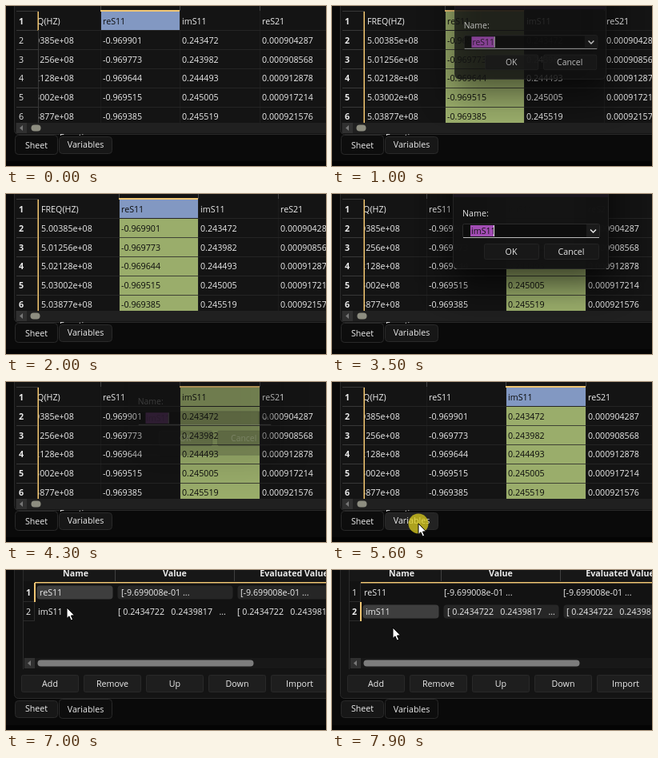
Animation of 400x200 px, one loop 8 s. Source, as an HTML page with a canvas:

```html
<!DOCTYPE html>
<html>
<head>
<meta charset="utf-8">
<style>
html, body { margin: 0; height: 100%; overflow: hidden; background: #0a0a0a; }
canvas { display: block; }
</style>
</head>
<body>
<canvas id="stage" width="400" height="200"></canvas>
<script>
const ctx = document.getElementById('stage').getContext('2d');
const LOOP = 8000, STEP = 100;
const ORANGE = '#f0c674', GREEN = '#9aad6b', BLUE = '#8298c2', LIGHT = '#ececec', EDGE = '#292929';

const columns = [
  { x: 41, w: 100, name: 'FREQ(HZ)', cells: ['5.00385e+08', '5.01256e+08', '5.02128e+08', '5.03002e+08', '5.03877e+08'] },
  { x: 141, w: 99, name: 'reS11', cells: ['-0.969901', '-0.969773', '-0.969644', '-0.969515', '-0.969385'] },
  { x: 240, w: 100, name: 'imS11', cells: ['0.243472', '0.243982', '0.244493', '0.245005', '0.245519'] },
  { x: 340, w: 100, name: 'reS21', cells: ['0.000904287', '0.000908568', '0.000912878', '0.000917214', '0.000921576'] }
];

// Pointer path: time, x, y
const path = [[4800, 112, 205], [4900, 111, 195], [5000, 110, 186], [5200, 108, 177], [5700, 108, 177],
  [6000, 106, 105], [6300, 100, 28], [6400, 99, 28], [7000, 76, 47], [7200, 74, 57], [7600, 74, 57], [7900, 76, 72]];

function rect(x, y, w, h, color) {
  ctx.fillStyle = color;
  ctx.fillRect(x, y, w, h);
}

function box(x, y, w, h, r, fill, stroke) {
  ctx.beginPath();
  ctx.roundRect(x + .5, y + .5, w - 1, h - 1, r);
  ctx.fillStyle = fill;
  ctx.fill();
  if (stroke) {
    ctx.strokeStyle = stroke;
    ctx.lineWidth = 1;
    ctx.stroke();
  }
}

function text(s, x, y, { color = LIGHT, bold = false, align = 'left' } = {}) {
  ctx.font = `${bold ? 'bold ' : ''}10.7px "Open Sans", "Noto Sans", sans-serif`;
  ctx.textAlign = align;
  ctx.fillStyle = color;
  ctx.fillText(s, x, Math.round(y + 4));
}

function clipped(x, y, w, h, draw) {
  ctx.save();
  ctx.beginPath();
  ctx.rect(x, y, w, h);
  ctx.clip();
  draw();
  ctx.restore();
}

function line(points, color, width = 1) {
  ctx.beginPath();
  points.forEach(([x, y]) => ctx.lineTo(x, y));
  ctx.strokeStyle = color;
  ctx.lineWidth = width;
  ctx.stroke();
}

function frame(variables, hover) {
  rect(0, 0, 400, 200, '#0a0a0a');
  rect(0, 194, 400, 6, '#040404');
  box(10, -10, 410, 171, 5, '#141414', EDGE);
  const tab = (x, w, name, active) => {
    const y = active ? 161 : 163;
    box(x, y, w, active ? 25 : 22, 4, active ? '#0d0d0d' : hover ? '#222' : '#171717', EDGE);
    text(name, x + w / 2, active ? 174 : 173, { align: 'center' });
  };
  tab(11, 54, 'Sheet', !variables);
  tab(66, 67, 'Variables', variables);
}

function scrollbar(x, y, thumbX, thumbW, track, color) {
  rect(x, y, 400 - x, 13, track);
  rect(x + 1, y, 13, 13, '#303030');
  ctx.beginPath();
  ctx.moveTo(x + 9, y + 3);
  ctx.lineTo(x + 5, y + 6.5);
  ctx.lineTo(x + 9, y + 10);
  ctx.fillStyle = '#777';
  ctx.fill();
  box(thumbX, y + 2, thumbW, 9, 4, color);
}

function sheet(selected, filled, scroll, dialogOpen) {
  const rowY = i => Math.round(6.6 + i * 23.8);
  clipped(11, 0, 389, 147, () => {
    for (const [i, col] of columns.entries()) {
      const x = col.x - scroll, active = i === selected;
      rect(x + col.w, 0, 1, 6, '#444');
      rect(x + col.w, 6, 1, 141, '#1c1c1c');
      if (active) {
        rect(x + 1, 7, col.w - 1, 23, dialogOpen ? GREEN : BLUE);
        if (filled) rect(x + 1, 31, col.w - 1, 116, GREEN);
        rect(x, 5, col.w, 2, ORANGE);
      }
      [col.name, ...col.cells].forEach((s, r) => {
        const dark = active && (r === 0 || filled);
        text(s, x + 3, 19 + r * 23.8, { color: dark ? '#0c0c0c' : LIGHT });
      });
    }
    for (let r = 1; r < 6; r++) rect(40, rowY(r), 360, 1, 'rgba(40,40,40,.8)');
    rect(11, 0, 30, 147, '#141414');
    rect(13, 6, 28, 1, '#383838');
    for (let r = 0; r < 6; r++) {
      const marked = filled || r === 0;
      text(r + 1, 19, 19 + r * 23.8, { bold: marked, align: 'center' });
      rect(13, rowY(r + 1), 27, 1, '#383838');
      rect(40, rowY(r), 1, 24, marked ? ORANGE : '#383838');
      if (marked) rect(39, rowY(r), 1, 24, '#8a7040');
    }
  });
  scrollbar(12, 146, scroll ? 31 : 30, 13, '#202020', '#8d8d80');
  clipped(60, 159, 70, 3, () => text('Functions', 67, 163.5));
}

function variablesPage(row) {
  rect(21, 0, 379, 124, '#121212');
  rect(21, 0, 1, 124, '#2b2b2b');
  rect(22, 0, 378, 14, '#171717');
  ['Name', 'Value', 'Evaluated Value'].forEach((s, i) =>
    text(s, [87, 211, 360][i], 4, { bold: true, align: 'center' }));
  rect(36, 15, 364, 1.5, row < 0 ? '#2b2b2b' : ORANGE);
  for (const x of [136, 285]) rect(x, 0, 1, 14, '#404040');
  for (let r = 0; r < 2; r++) {
    const y = 28 + r * 24, on = r === row;
    if (on) {
      box(38, y - 9, 96, 18, 4, '#3e3e3e');
      box(139, y - 9, 145, 18, 4, '#262626');
      box(289, y - 9, 120, 18, 4, '#262626');
    }
    const value = r ? '[ 0.2434722   0.2439817   ...' : '[-9.699008e-01 ...';
    text(r + 1, 28, y, { bold: on, align: 'center' });
    text(r ? 'imS11' : 'reS11', on ? 42 : 40, y);
    clipped(137, y - 12, 147, 24, () => text(value, on ? 144 : 140, y));
    text(value, on ? 293 : 289, y);
    rect(22, y + 11, 14, 1, '#2b2b2b');
    rect(35, y - 12, on ? 2 : 1, 24, on ? ORANGE : '#2b2b2b');
  }
  scrollbar(22, 110, 39, 271, '#181818', '#7c7c7c');
  ['Add', 'Remove', 'Up', 'Down', 'Import'].forEach((s, i) => {
    const x = 19 + i * 78;
    box(x, 131, 72, 22, 2, '#1e1e1e', EDGE);
    text(s, x + 36, 142, { align: 'center' });
  });
}

function dialog(name, alpha, scale) {
  const layer = draw => {
    ctx.save();
    ctx.globalAlpha = alpha;
    draw();
    ctx.restore();
  };
  ctx.save();
  ctx.translate(229, 10);
  ctx.scale(scale, scale);
  ctx.translate(-229, -10);
  layer(() => {
    ctx.shadowColor = 'rgba(0,0,0,.65)';
    ctx.shadowBlur = 40;
    ctx.shadowOffsetY = 18;
    box(151, -70, 195, 164, 6, '#141414', '#242424');
  });
  layer(() => {
    rect(152, 0, 193, 4, '#1b1720');
    text('Name:', 163, 24);
    box(163, 37, 172, 18, 2, '#0e0e0e', '#2c2c2c');
    rect(164, 54, 170, 1, '#bbb');
    rect(173, 39, 29, 14, '#a64fb8');
    text(name, 174, 46, { color: '#101010' });
    rect(202, 39, 1, 14, '#eee');
    rect(318, 38, 16, 16, '#1c1c1c');
    line([[323, 44.5], [326.5, 48], [330, 44.5]], '#eee', 1.5);
    for (const [label, x] of [['OK', 190], ['Cancel', 265]]) {
      box(x, 62, 69, 20, 2, '#191919', '#242424');
      text(label, x + 34, 72, { align: 'center' });
    }
  });
  ctx.restore();
}

function pointer(t) {
  if (t < 4900) return;
  let i = path.findIndex(p => p[0] >= t);
  if (i < 1) i = path.length - 1;
  const [a, b] = [path[i - 1], path[i]];
  const k = Math.min(1, (t - a[0]) / (b[0] - a[0]));
  const x = a[1] + (b[1] - a[1]) * k, y = a[2] + (b[2] - a[2]) * k;
  if ([5600, 5700, 6300, 7400].includes(t)) {
    ctx.beginPath();
    ctx.arc(x, y, 12.5, 0, 7);
    ctx.fillStyle = 'rgba(220,205,30,.75)';
    ctx.fill();
  }
  ctx.beginPath();
  [[0, 0], [0, 13.5], [3, 10.8], [5.2, 16], [7.6, 15], [5.4, 10], [9.6, 9.8]]
    .forEach(([dx, dy]) => ctx.lineTo(x + dx, y + dy));
  ctx.closePath();
  ctx.lineWidth = 1;
  ctx.strokeStyle = '#000';
  ctx.fillStyle = '#fff';
  ctx.fill();
  ctx.stroke();
}

// Opacity of a dialog that opens and closes in short fades
function fade(t, open, close) {
  if (t < open || t >= close + 200) return 0;
  if (t >= close) return t === close ? .6 : .2;
  return Math.min(1, .78 + (t - open) / 1000);
}

function draw(now) {
  const t = Math.floor(now % LOOP / STEP) * STEP;
  const variables = t >= 5700;
  frame(variables, t >= 5000 && !variables);
  if (variables) {
    variablesPage(t < 6300 ? -1 : t < 7400 ? 0 : 1);
  } else {
    const second = t >= 2500;
    const alpha = second ? fade(t, 3300, 4200) * (t >= 3500) : fade(t, 1000, 1800);
    const filled = second ? t >= 3000 : t >= 500;
    sheet(second ? 2 : 1, filled, t < 500 || second ? 23 : 0, alpha > 0);
    if (alpha) dialog(second ? 'imS11' : 'reS11', alpha, alpha > .85 ? 1 : .974);
  }
  pointer(t);
}

const start = performance.now();
function tick() {
  draw(performance.now() - start);
  requestAnimationFrame(tick);
}
tick();
</script>
</body>
</html>
```
